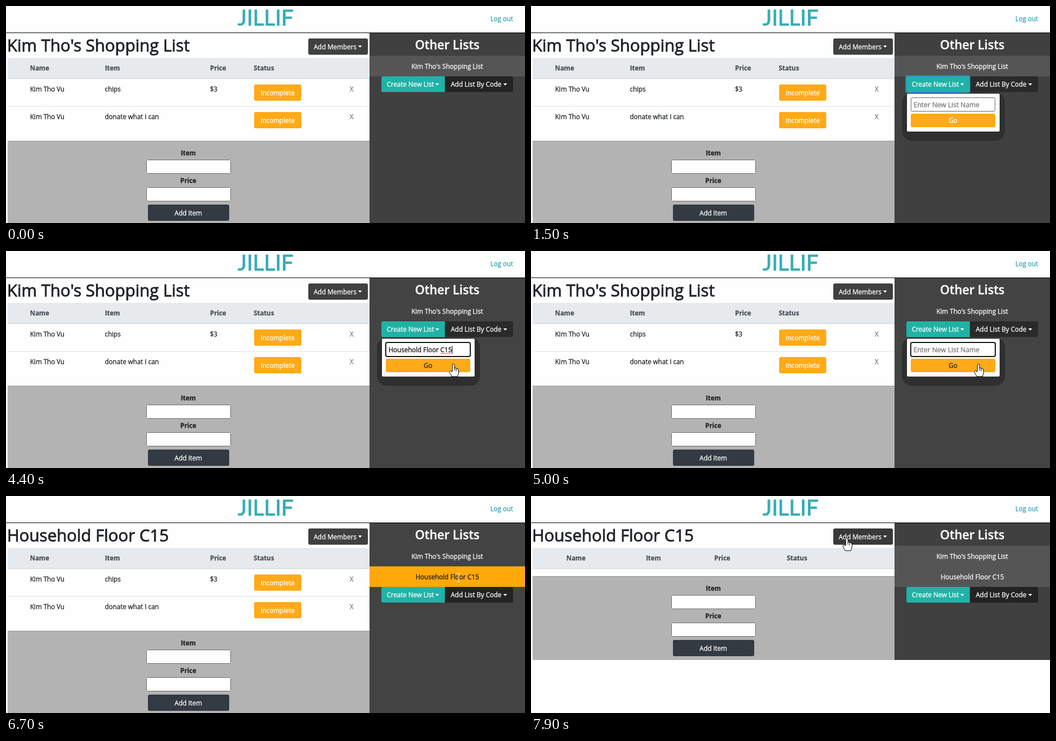
Write an HTML page with a canvas that moves like this. It is 958x401 px and loops after 8 s.

```html
<!DOCTYPE html>
<html lang="en">
<head>
<meta charset="utf-8">
<title>Shopping list</title>
<style>
html, body { margin: 0; width: 100%; height: 100%; overflow: hidden; background: #fefefe; }
canvas { display: block; }
</style>
</head>
<body>
<canvas id="stage" width="958" height="401"></canvas>
<script>
const ctx = document.getElementById('stage').getContext('2d');
const LOOP = 8000;
const SANS = '"Open Sans", "Noto Sans", sans-serif';
const BODY = '12px ' + SANS;
const BOLD = 'bold 11.8px ' + SANS;
const OWNER = 'Kim Tho Vu';
const FIRST_LIST = "Kim Tho's Shopping List";
const NEW_LIST = 'Household Floor C15';
const AMBER = '#ffaa17', INK = '#212529';

// When each part of the story happens, in ms
const AT = {
  open: 1200, focus: 2000, go: 4100, cleared: 5000, added: 5200,
  close: 5900, hover: 6300, title: 6700, loaded: 7000, leave: 7700
};
const TYPED = [[2000, 1], [2100, 3], [2200, 4], [2600, 13], [2700, NEW_LIST.length]];

// Pointer path: time, x, y, shape
const PATH = [
  [200, 770, 6, ''], [300, 770, 12, 'arrow'], [900, 762, 132, 'hand'], [1000, 760, 141, 'hand'],
  [1400, 760, 141, ''], [2900, 756, 187, 'beam'], [3200, 817, 184, 'beam'],
  [3400, 829, 188, 'beam'], [3500, 829, 188, 'beam'], [3600, 829, 183, 'beam'],
  [3900, 829, 193, 'beam'], [4100, 828, 203, 'hand'], [4400, 826, 209, 'hand'],
  [5300, 826, 209, 'hand'], [5400, 826, 230, 'hand'], [5500, 825, 268, 'arrow'],
  [5800, 821, 322, 'arrow'], [5900, 821, 322, 'arrow'], [6200, 832, 180, 'arrow'],
  [6300, 834, 158, 'beam'], [6500, 835, 150, 'beam'], [7600, 835, 150, 'beam'],
  [7700, 750, 126, 'arrow'], [7900, 583, 78, 'hand']
];
const HAND = new Path2D('M-2 14V1.5Q-2 0 0 0T2 1.5V7Q4.500 6 5 8Q7.500 7 8 9.500Q9.500 9 9.500 11V16L7.500 23H-3L-7 16Q-8 12 -5.500 12.500Z');
const ARROW = new Path2D('M0 0V16L3.700 12.500L6.500 18.500L9 17.400L6.300 11.500H11.300Z');

function box(x, y, w, h, fill, r = 0) {
  ctx.fillStyle = fill;
  ctx.beginPath();
  ctx.roundRect(x, y, w, h, r);
  ctx.fill();
}

function frame(x, y, w, h, color, line, r) {
  ctx.strokeStyle = color;
  ctx.lineWidth = line;
  ctx.beginPath();
  ctx.roundRect(x + line / 2, y + line / 2, w - line, h - line, r);
  ctx.stroke();
}

// The thin outline gives a weight between regular and semibold
function label(str, x, y, color = INK, font = BODY, align = 'left', weight = 0.3) {
  ctx.font = font;
  ctx.fillStyle = ctx.strokeStyle = color;
  ctx.textAlign = align;
  ctx.lineWidth = weight;
  ctx.lineJoin = 'round';
  ctx.fillText(str, x, y);
  ctx.strokeText(str, x, y);
}

function center(str, x, y, color, font, weight) {
  label(str, x, y, color, font, 'center', weight);
}

function caretDown(x, y) {
  ctx.fillStyle = '#fff';
  ctx.beginPath();
  ctx.moveTo(x, y);
  ctx.lineTo(x + 7, y);
  ctx.lineTo(x + 3.5, y + 4);
  ctx.fill();
}

function header() {
  center('JILLIF', 479, 36, '#34adb5', '40px Lato, sans-serif', 0.9);
  label('Log out', 894, 28, '#2fa4b5');
  box(0, 49, 958, 1, '#000');
}

function itemRow(y, item, price) {
  label(OWNER, 44.5, y + 13);
  label(item, 182.5, y + 13);
  label(price, 376.5, y + 13);
  box(458, y, 87, 30, AMBER, 3);
  center('Incomplete', 501.5, y + 20, '#fff');
  center('X', 638, y + 13, '#777');
}

function mainPane(t) {
  const loaded = t >= AT.loaded;
  label(t < AT.title ? FIRST_LIST : NEW_LIST, 2, 84, INK, '30.6px ' + SANS, 'left', 0.9);
  box(558, 60, 110, 30, t >= 7900 ? '#393939' : '#404040', 3);
  label('Add Members', 568, 80, '#fff');
  caretDown(650, 73);

  box(3, 96, 668, 38, '#e6eaed');
  box(3, 133, 668, 2, '#dadfe3');
  const heads = ['Name', 'Item', 'Price', 'Status'];
  const xs = loaded ? [83, 226, 353, 491] : [62, 196.5, 391.5, 476];
  heads.forEach((h, i) => center(h, xs[i], 119, '#495057', BOLD));

  if (!loaded) {
    itemRow(145, 'chips', '$3');
    box(3, 185, 668, 1, '#dee2e6');
    itemRow(196, 'donate what I can', '');
  }
  form(loaded ? 148 : 249);
}

function form(y) {
  box(3, y, 668, 155, '#b3b3b3');
  box(3, y, 668, 1, '#999');
  ['Item', 'Price'].forEach((name, i) => {
    const top = y + 51 * i;
    center(name, 336.5, top + 27, INK, BOLD);
    box(259, top + 35, 156, 26, '#fff', 2);
    frame(259, top + 35, 156, 26, '#6c6c6c', 1, 2);
  });
  box(262, y + 118, 150, 30, '#333a41', 3);
  center('Add Item', 336.5, y + 138, '#fff');
}

function listRow(y, name, fill, color = '#fff') {
  if (fill) box(671, y, 287, 38, fill);
  center(name, 814.5, y + 24, color);
}

function sidebar(t) {
  const flat = t >= AT.go && t < AT.leave;
  const bar = flat ? '' : '#555';
  const added = t >= AT.added;
  const hover = t >= AT.hover && t < AT.leave;
  const open = t >= AT.open && t < AT.close;
  const y = added ? 168 : 130;

  box(671, 50, 287, t < AT.loaded ? 351 : 253, flat ? '#434343' : '#404040');
  center('Other Lists', 814.5, 80, '#fff', '600 22.6px ' + SANS);
  listRow(92, FIRST_LIST, bar);
  if (added) listRow(130, NEW_LIST, hover ? '#ffa80a' : bar, hover ? '#1a1a1a' : '#fff');

  if (open) box(685, y + 30, 190, 89, '#2f2f2f', 18);
  box(693, y, 117, 29, '#20b2a6', [3, 0, 0, 3]);
  box(810, y, 126, 29, open ? '#2a2a2a' : '#232323', [0, 3, 3, 0]);
  if (t >= AT.open && t < AT.focus) frame(691, y - 2, 120, 33, '#3c7fc0', 2, 3);
  label('Create New List', 703, y + 19, '#fff');
  caretDown(792.5, y + 13);
  label('Add List By Code', 821, y + 19, '#fff');
  caretDown(918, y + 13);
  if (open) dropdown(t, y + 32);
}

function squiggle(x, y, w) {
  ctx.strokeStyle = '#e33';
  ctx.lineWidth = 1;
  ctx.beginPath();
  for (let i = 0; i <= w; i += 2) ctx.lineTo(x + i, y + (i % 4 ? 1 : -1));
  ctx.stroke();
}

function dropdown(t, y) {
  const focused = t >= AT.focus && t < AT.added;
  const filled = t >= AT.focus && t < AT.cleared;
  box(694, y, 171, 70, '#fff', 2);
  if (focused) frame(700, y + 6, 158, 28, '#101010', 2, 3);
  else frame(701, y + 7, 156, 26, '#5f5f5f', 1, 2);

  if (filled) {
    const count = TYPED.filter(k => k[0] <= t).pop()[1];
    const str = NEW_LIST.slice(0, count);
    label(str, 706, y + 25, '#111');
    const end = 706 + ctx.measureText(str).width;
    if (count === NEW_LIST.length) {
      const start = 706 + ctx.measureText(str.slice(0, -3)).width;
      squiggle(start, y + 27.5, end - start);
    }
    box(Math.round(end), y + 13, 1, 15, '#000');
  } else {
    label('Enter New List Name', 706, y + 25, '#757575', '12.5px ' + SANS);
  }

  box(701, y + 37, 156, 25, AMBER, 3);
  const tone = t < AT.go ? '#fff' : t < AT.added ? INK : '#94823f';
  if (t >= AT.added) frame(700, y + 36, 158, 27, '#cfd3d6', 1, 3);
  center('Go', 779, y + 54, tone);
}

function pointer(t) {
  const i = PATH.findLastIndex(k => k[0] <= t);
  if (i < 0 || !PATH[i][3]) return;
  const [t0, x0, y0, shape] = PATH[i];
  const [t1, x1, y1] = PATH[i + 1] || [LOOP, x0, y0];
  const p = (t - t0) / (t1 - t0);
  const x = Math.round(x0 + (x1 - x0) * p);
  const y = Math.round(y0 + (y1 - y0) * p);

  ctx.save();
  ctx.translate(x, y);
  if (shape === 'beam') {
    const color = t >= AT.hover ? '#fff0d0' : '#222';
    box(0, -7, 1, 15, color);
    for (const dy of [-8, 8]) {
      box(-3, dy, 3, 1, color);
      box(1, dy, 3, 1, color);
    }
  } else {
    const path = shape === 'hand' ? HAND : ARROW;
    ctx.lineWidth = 1;
    ctx.lineJoin = 'round';
    ctx.fillStyle = '#fff';
    ctx.strokeStyle = '#000';
    ctx.fill(path);
    ctx.stroke(path);
    if (shape === 'hand') {
      ctx.beginPath();
      for (const [hx, hy] of [[2, 7], [5, 8]]) {
        ctx.moveTo(hx, hy);
        ctx.lineTo(hx, hy + 5);
      }
      ctx.stroke();
    }
  }
  ctx.restore();
}

function draw() {
  const t = Math.floor(performance.now() % LOOP / 100) * 100;
  box(0, 0, 958, 401, '#fefefe');
  header();
  mainPane(t);
  sidebar(t);
  pointer(t);
  requestAnimationFrame(draw);
}
draw();
</script>
</body>
</html>
```
